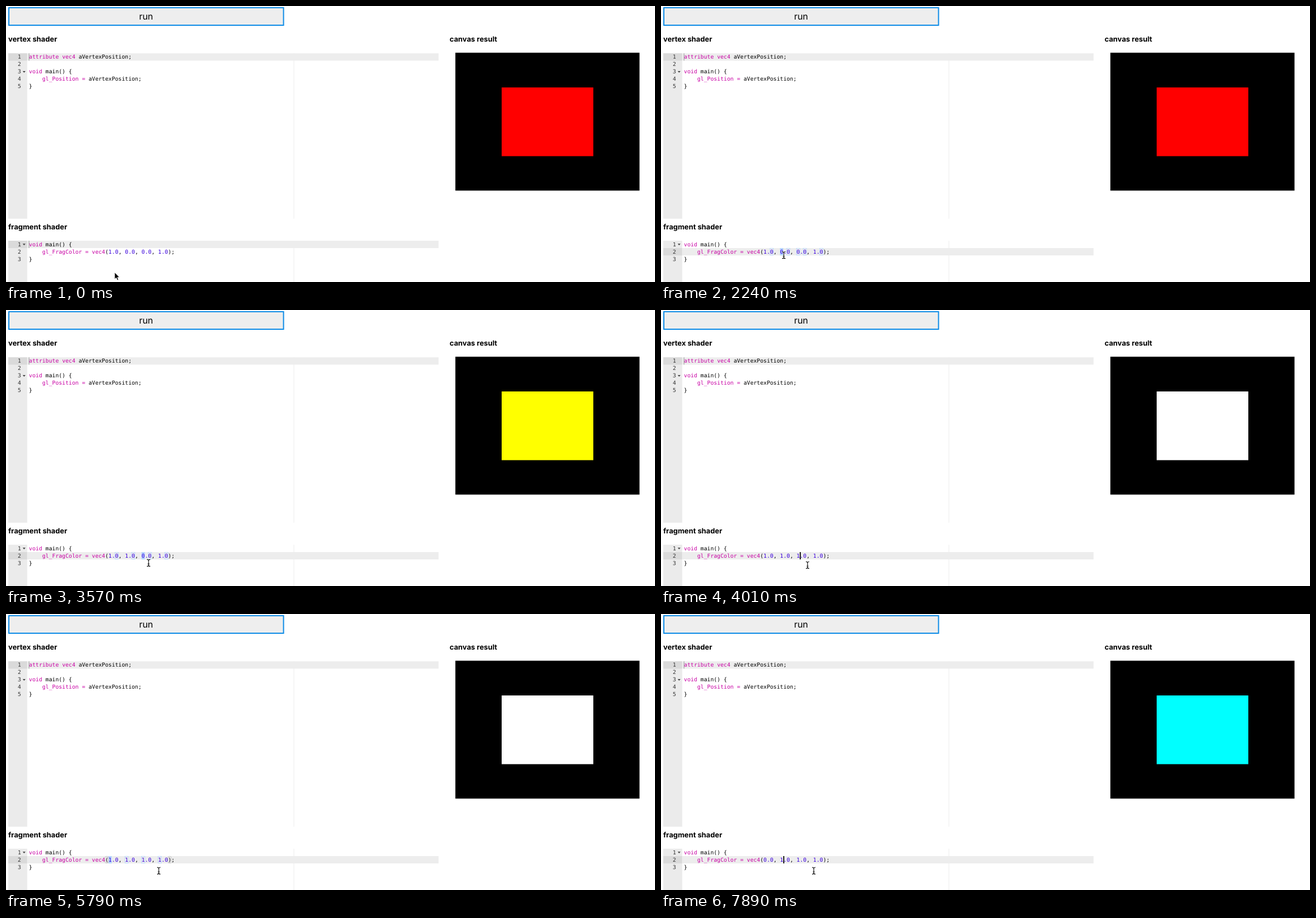
An HTML page that plays this animation: 1147x488 px, repeating every 8000 ms.

```html
<!DOCTYPE html>
<html lang="en">
<head>
<meta charset="utf-8">
<title>Shader editor</title>
<style>
  html, body { margin: 0; width: 100%; height: 100%; overflow: hidden; background: #fff; }
  svg { display: block; width: 1147px; height: 488px; }
  text { font-family: Inter, sans-serif; text-rendering: geometricPrecision; white-space: pre; }
  .title { font-weight: 700; font-size: 12.8px; }
  .code text { font: 9.72px "DejaVu Sans Mono", monospace; }
  .key { fill: #c800a4; }
  .num { fill: #3a00dc; }
  .line { text-anchor: end; fill: #333; }
</style>
</head>
<body>
<svg viewBox="0 0 1147 488">
  <defs><path id="bar" d="M-3-6Q0-6 0-4Q0-6 3-6M0-4V4M-3 6Q0 6 0 4Q0 6 3 6M-1.5 2H1.5"/></defs>
  <rect x="5" y="3" width="485.5" height="31" fill="#eee" stroke="#0f8ce6" stroke-width="2"/>
  <text x="247.5" y="24.3" font-size="15.8" text-anchor="middle">run</text>
  <text class="title" x="4" y="63">vertex shader</text>
  <text class="title" x="4" y="394.5">fragment shader</text>
  <text class="title" x="784" y="63">canvas result</text>
  <rect x="794.2" y="82.6" width="325.4" height="243.8"/>
  <rect id="quad" x="876" y="144" width="162" height="121.5"/>
  <g id="vertex" class="code"></g>
  <g id="fragment" class="code"></g>
  <path id="arrow" d="M-1-6V6L1.8 3.5 3.8 8 5.8 7.1 3.9 2.8H7.6Z" stroke="#fff" stroke-width=".8"/>
  <g id="beam" fill="none">
    <use href="#bar" stroke="#fff" stroke-width="2.2"/>
    <use href="#bar" stroke="#000" stroke-width="1.1"/>
  </g>
</svg>
<script>
const LOOP = 8000, TICK = 148.8, LEFT = 40.6, CHAR = 5.85, ROW = 13;
const $ = id => document.getElementById(id);
const colX = col => LEFT + col * CHAR;

const rect = (x, y, w, h, fill) =>
  `<rect x="${x}" y="${y}" width="${w}" height="${h}" fill="${fill}"/>`;
const box = (col, y, stroke, r = 0) =>
  `<rect x="${colX(col)}" y="${y + .5}" width="${CHAR}" height="${ROW - 1}" rx="${r}"
    fill="none" stroke="${stroke}" stroke-width=".8"/>`;
const paint = line => line.replace(/\b(?:attribute|void|vec4|gl_\w+)\b|=|\b\d\.\d/g,
  word => `<tspan class="${/^\d/.test(word) ? "num" : "key"}">${word}</tspan>`);
const blurCaret = top => rect(LEFT - .2, top, .8, ROW, "#888");

function editor(top, height, lines, active, marks, caret) {
  const y = top + active * ROW;
  const text = lines.map((line, i) => {
    const rowY = top + i * ROW, base = rowY + 9.7;
    const fold = line.endsWith("{") ? `<path d="M29.5 ${rowY + 5.3}h5l-2.5 3z" fill="#444"/>` : "";
    return `<text class="line" x="26.7" y="${base}">${i + 1}</text>
      <text x="${LEFT}" y="${base}">${paint(line)}</text>${fold}`;
  }).join("");
  return rect(4, top, 33.5, height, "#ebebeb") + rect(4, y, 33.5, ROW, "#dadada") +
    rect(508.5, top, .8, height, "#e8e8e8") + rect(37.5, y, 727, ROW, "#ededed") +
    marks + text + caret;
}

// Each edit clicks beside a digit, drags over it, then types its opposite.
const edits = [
  { digit: 1, click: 12, drag: 14, type: 17 },
  { digit: 2, click: 21, drag: 22, type: 26 },
  { digit: 0, click: 33, drag: 34, type: 42, leftward: 1 }
];
const WALK = 46;

function editState(tick) {
  const digits = [1, 0, 0];
  let caret = 0, selected = 0;
  for (const { digit, click, drag, type, leftward = 0 } of edits) {
    const col = 24 + 5 * digit;
    if (tick >= click) caret = col + leftward;
    if (tick >= drag) { caret = col + 1 - leftward; selected = col; }
    if (tick >= type) { caret = col + 1; selected = 0; digits[digit] ^= 1; }
  }
  if (tick >= WALK) caret += 1 + Math.floor((tick - WALK) * .6);
  return { digits, caret, selected };
}

function drawFragment({ digits, caret, selected }) {
  const code = `    gl_FragColor = vec4(${digits.map(d => d + ".0").join(", ")}, 1.0);`;
  const top = 415, y = top + ROW;
  let marks = "";
  if (selected) {
    [...code].forEach((char, col) => {
      if (col === selected) marks += rect(colX(col), y, CHAR, ROW, "#b5d5ff");
      else if (char === code[selected]) marks += box(col, y, "#b5d5ff");
    });
    if (code[caret - 1] === "(")
      marks += box(caret - 1, y, "#bfbfbf", 2) + box(code.indexOf(")"), y, "#bfbfbf", 2);
  }
  const bar = !caret ? blurCaret(top) : selected ? "" : rect(colX(caret), y, 1.7, ROW, "#000");
  $("fragment").innerHTML = editor(top, 73, ["void main() {", code, "}"], caret ? 1 : 0, marks, bar);
  $("quad").setAttribute("fill", `rgb(${digits.map(d => d * 255)})`);
}

// Pointer glides: departure tick, arrival tick, x, y
const glides = [
  [0, 0, 193, 477], [1, 10, 209.5, 440.5], [13, 15, 217, 440.5], [15, 17, 228, 452.5],
  [17, 21, 239, 440], [21, 26, 259, 451], [27, 33, 187, 435], [33, 35, 182.5, 435],
  [36, 39, 270, 454]
];

function drawPointer(tick) {
  let x = 0, y = 0;
  for (const [from, to, toX, toY] of glides) {
    const p = Math.min(1, Math.max(0, (tick - from) / (to - from || 1)));
    const ease = to ? p * p * (3 - 2 * p) : 1;
    x += (toX - x) * ease;
    y += (toY - y) * ease;
  }
  for (const id of ["arrow", "beam"]) {
    $(id).setAttribute("transform", `translate(${x} ${y})`);
    $(id).style.display = (id === "arrow") === (tick < 2) ? "" : "none";
  }
}

$("vertex").innerHTML = editor(83.6, 292.5,
  ["attribute vec4 aVertexPosition;", "", "void main() {", "    gl_Position = aVertexPosition;", "}"],
  0, "", blurCaret(83.6));

let shown;
function frame(now) {
  const tick = Math.floor((now % LOOP + 16) / TICK);
  if (tick !== shown) {
    drawFragment(editState(tick));
    drawPointer(tick);
    shown = tick;
  }
  requestAnimationFrame(frame);
}
requestAnimationFrame(frame);
</script>
</body>
</html>
```
